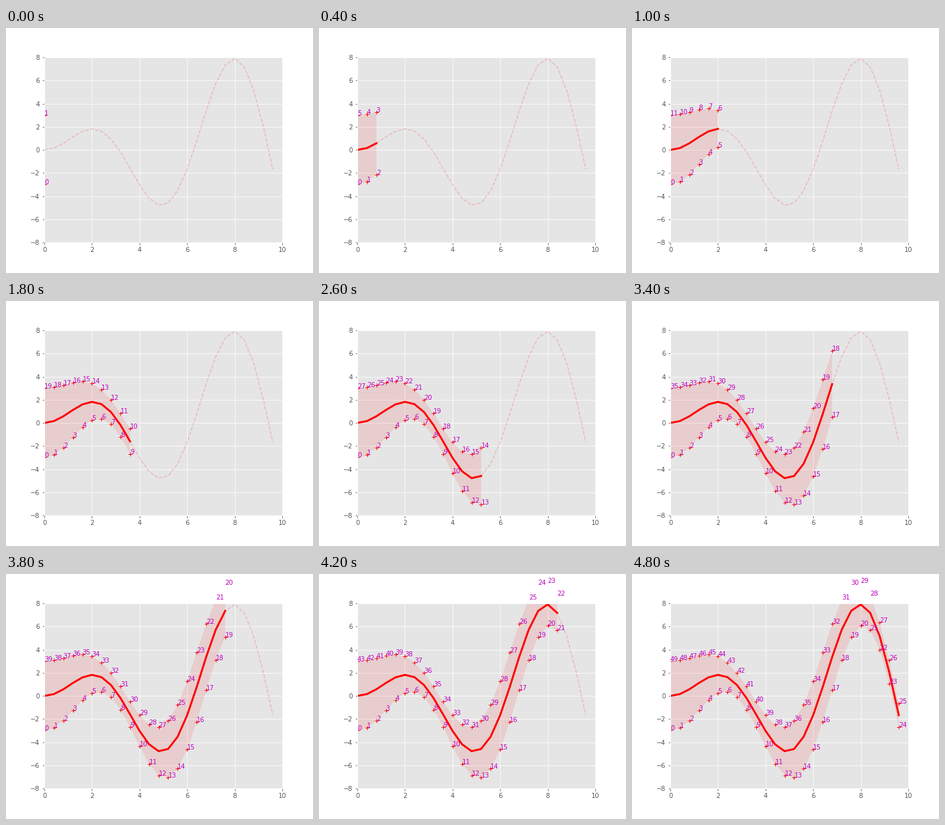
These frames come from a looping animation (480x384 px, 5000 ms). A matplotlib script:

```python
import numpy as np
import matplotlib.pyplot as plt
from matplotlib.animation import FuncAnimation

plt.style.use("ggplot")
plt.rcParams["font.family"] = "DejaVu Sans"

DPI = 72
INTERVAL = 200

x = np.arange(25) * 0.4
y = x * np.sin(x)
spread = 2 + np.cos(x)
lower, upper = y - spread, y + spread

fig, ax = plt.subplots(figsize=(480 / DPI, 384 / DPI), dpi=DPI)
fig.subplots_adjust(left=0.125, right=0.9, bottom=0.125, top=0.88)
ax.set(xlim=(0, 10), ylim=(-8, 8),
       xticks=range(0, 11, 2), yticks=range(-8, 9, 2))

ax.plot(x, y, "r--", lw=1.5, alpha=0.2)
curve, = ax.plot([], [], "r-", lw=3)
corners, = ax.plot([], [], "r+", ms=6, mew=1)
band, = ax.fill([0, 0], [-3, 3], facecolor="r", edgecolor="none", alpha=0.1)
labels = [ax.text(0, 0, str(k), color="m", fontsize=10, visible=False)
          for k in range(2 * len(x))]


def outline(n):
    """Band corners: along the lower edge, then back along the upper one."""
    return np.column_stack([
        np.r_[x[:n], x[:n][::-1]],
        np.r_[lower[:n], upper[:n][::-1]],
    ])


def draw(step):
    n = step + 1
    points = outline(n)
    curve.set_data(x[:n], y[:n])
    corners.set_data(points[:, 0], points[:, 1])
    band.set_xy(points)
    for k, label in enumerate(labels):
        label.set_visible(k < len(points))
        if k < len(points):
            label.set_position(points[k])
    return [band, curve, corners, *labels]


anim = FuncAnimation(fig, draw, frames=len(x), init_func=lambda: draw(0),
                     interval=INTERVAL, repeat=True, repeat_delay=0)
plt.show()
```
